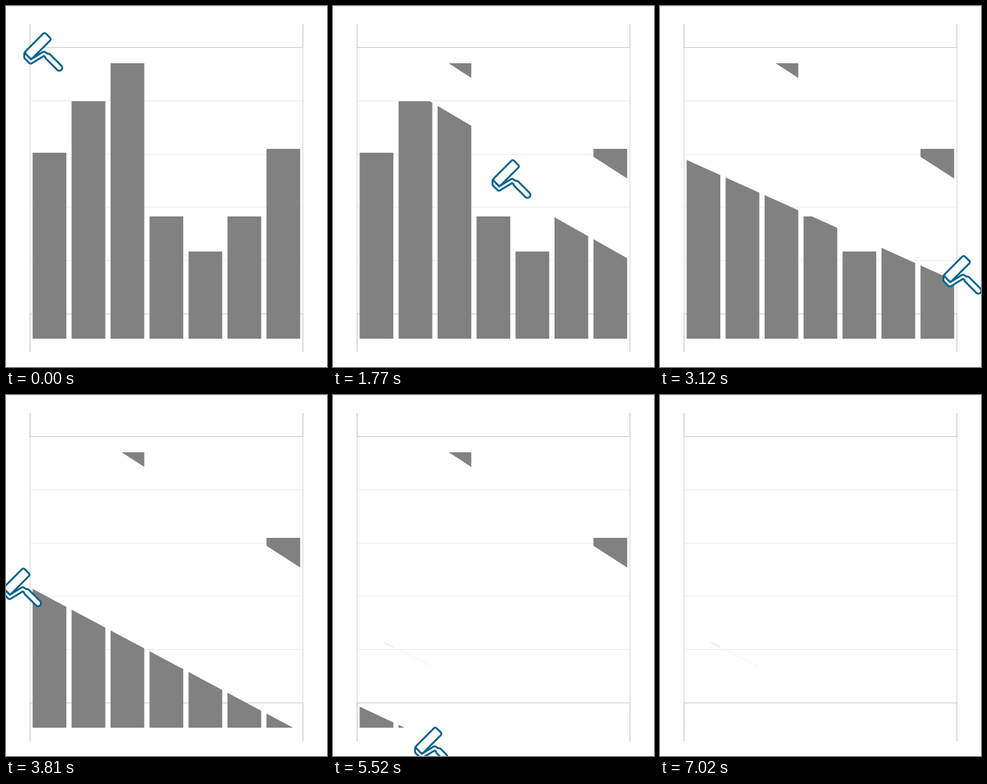
Write a matplotlib script that moves like this. It is 500 px wide and 561 px high and loops after 7.11 s.

```python
from collections import namedtuple

import numpy as np
import matplotlib.pyplot as plt
from matplotlib.animation import FuncAnimation
from matplotlib.patches import Polygon
from matplotlib.transforms import Affine2D

W, H, DPI = 500, 561, 100
FRAMES, STEP_MS = 237, 30
PX = 72 / DPI
BLUE = "#00638a"
DEPTH, TIP = 110, 36  # height of a wiped band, drum tip below the roller's top

# Each stroke runs at even speed along a straight lower edge y = base + slope * x
Stroke = namedtuple("Stroke", "start end x0 x1 base slope")
STROKES = [Stroke(*s) for s in (
    (0, 43, 27, 449, 59.6, 0.587),
    (50, 72, 411, 10, 134, 0.563),
    (87.6, 102, 55, 440, 220.5, 0.45),
    (108, 123, 440, -11, 279.2, 0.532),
    (128.35, 136, 1, 403, 344.2, 0.51),
    (138, 147, 400, -12, 408.7, 0.52),
    (151.65, 179, 29, 170, 464.7, 0.47),
    (180, 202, 169, -66, 500, 0.4),
    (206.4, 234, -66, 503, -25, 0.644),
)]

xs = np.arange(W)[None, :] + 0.5
ys = np.arange(H)[:, None] + 0.5


def soft(d):
    return np.clip(d + 0.5, 0, 1)


def on_stroke(s, x):
    return np.array([x, s.base + s.slope * (x + 1) - TIP])


def roller_at(t):
    here = on_stroke(STROKES[0], STROKES[0].x0)
    for s in STROKES:
        first = on_stroke(s, s.x0)
        if t < s.start:  # turn, slowly at first, towards the next stroke
            return here + (first - here) * ((t - pause) / (s.start - pause)) ** 3
        last = on_stroke(s, s.x1)
        if t < s.end:
            return first + (last - first) * (t - s.start) / (s.end - s.start)
        here, pause = last, s.end
    return here


def band(s, raised=0):
    lower = s.base + s.slope * xs
    upper = lower - DEPTH
    if s is STROKES[0]:
        upper = -27 + 0.644 * xs + raised
    return soft(ys - upper) * soft(lower - ys)


def bar(k, top):
    x = 41.5 + 60.7 * k
    return soft(xs - x) * soft(x + 52.5 - xs) * soft(ys - top) * soft(517 - ys)


TOPS = (228, 148, 89, 327, 381.5, 327, 222)
left = [sum(bar(k, top) for k, top in enumerate(TOPS))]
for s in STROKES:
    left.append(left[-1] * (1 - band(s)))


def bars_left(t):
    done = sum(t >= s.end for s in STROKES)
    gray = left[done]
    if done < len(STROKES) and t > STROKES[done].start:
        s = STROKES[done]
        x, y = roller_at(t)
        front = x + 1 + np.clip(y + TIP - ys, 0, 36)
        wiped = soft(np.sign(s.x1 - s.x0) * (front - xs))
        gray = gray * (1 - band(s, raised=8) * wiped)
    return gray


fig = plt.figure(figsize=(W / DPI, H / DPI), dpi=DPI, facecolor="white")
ax = fig.add_axes([0, 0, 1, 1])
ax.axis("off")


def rule(x, y, color, z=1):
    return ax.plot(x, y, color=color, lw=PX, zorder=z, snap=False,
                   solid_capstyle="butt")[0]


rule((0, W), (0.5, 0.5), "#ededed")
for k in range(6):
    y = np.floor(64.5 + 82.8 * k) + 0.5
    rule((37, 463), (y, y), "#c8c8c8" if k in (0, 5) else "#ebebeb")
for x in (37.5, 462.5):
    rule((x, x), (28, 538), "#d2d2d2")
    for y0, y1 in ((28, 65), (478, 538)):
        rule((x, x), (y0, y1), "#bababa")

rgba = np.full((H, W, 4), 129, np.uint8)
chart = ax.imshow(rgba, extent=(0, W, H, 0), interpolation="nearest",
                  aspect="auto", zorder=2)

# Faint seam between two strokes
seam = [rule((a, b), (345 + a / 2, 345 + b / 2), color, 3)
        for a, b, color in ((79, 94, "#e0e0e0"), (103, 153, "#f3f3f3"))]


def tube(points, radius, z, closed=False):
    """Round-edged shape: a wide blue stroke under a narrower white one."""
    return [ax.add_patch(Polygon(points, closed=closed, fill=closed, fc=color,
                                 ec=color, lw=2 * (radius + grow) * PX, zorder=z + dz,
                                 joinstyle="round", capstyle="round"))
            for color, grow, dz in ((BLUE, 1.45, 0), ("white", -1.45, 0.5))]


tilt = Affine2D().rotate_deg(-45).translate(22.7, 21.9)
drum = tilt.transform([(-19.2, -4.6), (19.2, -4.6), (19.2, 4.6), (-19.2, 4.6)])
roller = (tube([(4.5, 34), (4.5, 39.5), (11.5, 46.5), (32, 34), (38, 38)], 3, 4)
          + tube([(38.5, 38.5), (56, 56)], 4.6, 4)
          + tube(drum, 3, 5, closed=True))

ax.set_xlim(0, W)
ax.set_ylim(H, 0)


def update(t):
    rgba[..., 3] = np.round(255 * bars_left(t))
    chart.set_data(rgba)
    for line in seam:
        line.set_visible(t >= STROKES[5].end)
    shift = Affine2D().translate(*roller_at(t)) + ax.transData
    for part in roller:
        part.set_transform(shift)
    return [chart, *seam, *roller]


anim = FuncAnimation(fig, update, frames=FRAMES, interval=STEP_MS,
                     init_func=lambda: update(0), repeat=True, repeat_delay=0)
plt.show()
```
